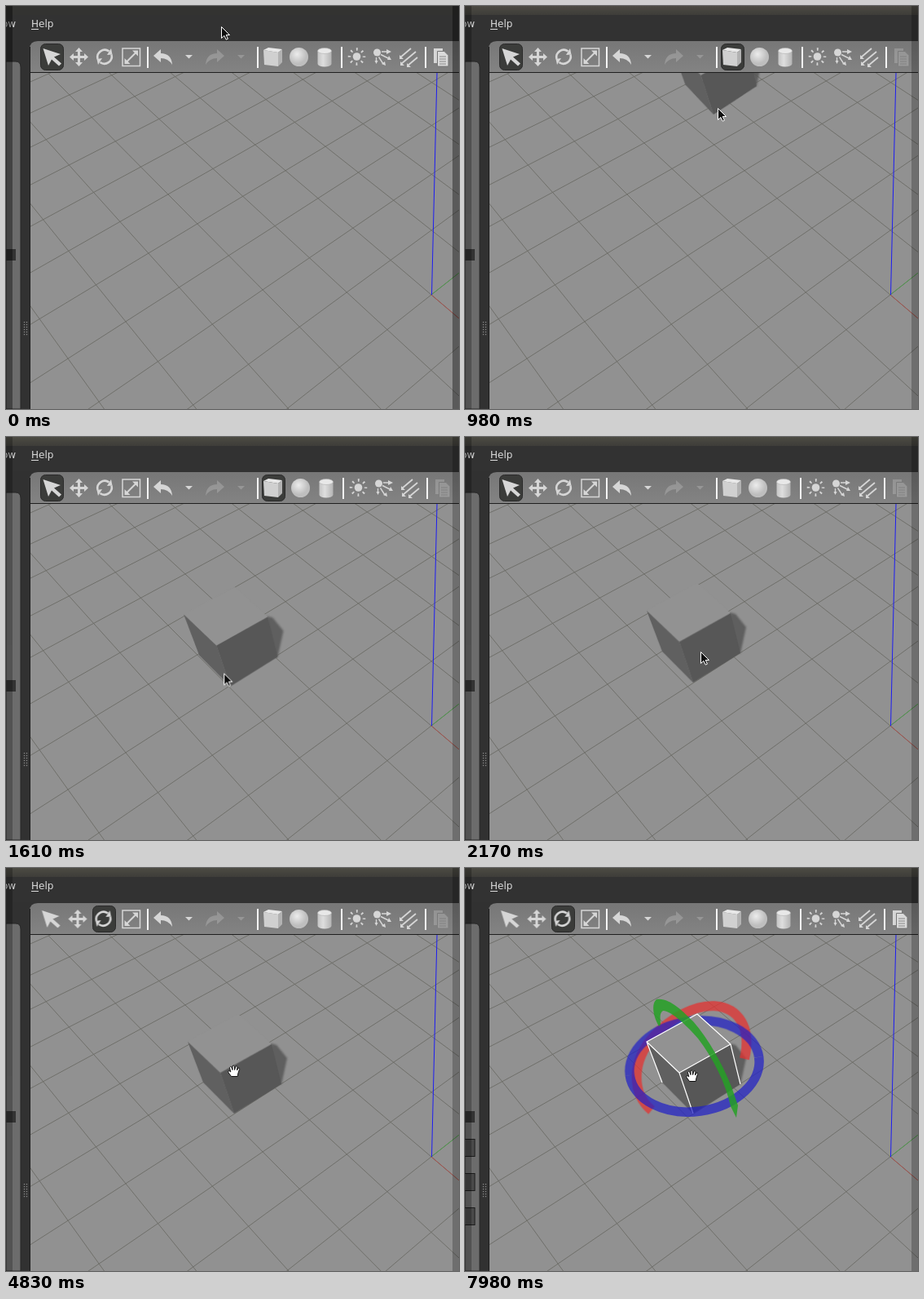
An HTML page that plays this animation: 556x494 px, repeating every 8 s.

```html
<!DOCTYPE html>
<html lang="en">
<head>
<meta charset="utf-8">
<title>Rotate tool</title>
<style>
html, body { margin: 0; width: 100%; height: 100%; overflow: hidden; background: #323232; }
svg { display: block; width: 100%; height: 100%; }
text { font: 12px "DejaVu Sans", sans-serif; fill: #dcdcdc; }
.anim, .anim * { animation-duration: 8s; animation-iteration-count: infinite; animation-timing-function: step-end; }

#arrow { animation-name: arrow; }
@keyframes arrow {
  0% { transform: translate(264px, 25px); }
  .875% { transform: translate(264px, 25px); animation-timing-function: steps(6, start); }
  6.125% { transform: translate(332px, 72px); }
  7.875% { transform: translate(332px, 72px); animation-timing-function: steps(6, start); }
  13.125% { transform: translate(310px, 125px); animation-timing-function: steps(4, start); }
  16.625% { transform: translate(282px, 268px); animation-timing-function: steps(2, start); }
  18.375% { transform: translate(253px, 303px); animation-timing-function: steps(4, start); }
  21.875% { transform: translate(272px, 285px); }
  25.375% { transform: translate(272px, 285px); animation-timing-function: steps(3, start); }
  28% { transform: translate(289px, 263px); animation-timing-function: steps(9, start); }
  35.875% { transform: translate(283px, 252px); animation-timing-function: steps(1, start); }
  37.625% { transform: translate(278px, 252px); animation-timing-function: steps(1, start); }
  59.5%, 100% { transform: translate(284px, 251px); }
}
#hand { animation-name: hand; }
@keyframes hand {
  0% { transform: translate(276px, 247px); }
  60.375% { transform: translate(272px, 241px); }
  88.375% { transform: translate(272px, 243px); animation-timing-function: steps(3, start); }
  91% { transform: translate(270px, 255px); }
  92.75% { transform: translate(270px, 255px); animation-timing-function: steps(2, start); }
  94.5% { transform: translate(268px, 254px); }
  99.75%, 100% { transform: translate(271px, 247px); }
}
#cube { transform-origin: 280px 301px; animation-name: cube; }
@keyframes cube {
  0% { transform: translate(53px, -221px) scale(.86); }
  7.875% { transform: translate(53px, -221px) scale(.86); animation-timing-function: steps(6, start); }
  13.125% { transform: translate(25px, -168px) scale(.91, .96); animation-timing-function: steps(4, start); }
  16.625% { transform: translate(12px, -21px) scale(.985); animation-timing-function: steps(2, start); }
  18.375% { transform: translate(-19px, 19px) scale(1.01); animation-timing-function: steps(4, start); }
  21.875%, 100% { transform: none; }
}

/* on / off states */
.arrowOn { animation-name: arrowOn; }
@keyframes arrowOn { 0% { opacity: 1; } 59.5%, 100% { opacity: 0; } }
.handOn { animation-name: handOn; }
@keyframes handOn { 0% { opacity: 0; } 59.5%, 100% { opacity: 1; } }
.grab { animation-name: grab; }
@keyframes grab { 0% { opacity: 0; } 82.25% { opacity: 1; } 88.375%, 100% { opacity: 0; } }
.open { animation-name: open; }
@keyframes open { 0% { opacity: 1; } 82.25% { opacity: 0; } 88.375%, 100% { opacity: 1; } }
.picked { animation-name: picked; }
@keyframes picked { 0% { opacity: 0; } 82.25%, 100% { opacity: 1; } }
.copy { animation-name: copy; }
@keyframes copy { 0% { opacity: 1; } 7.875% { opacity: .28; } 82.25%, 100% { opacity: 1; } }
.insert { animation-name: insert; }
@keyframes insert { 0% { opacity: 0; } 7.875% { opacity: 1; } 25.375%, 100% { opacity: 0; } }
.pushed { animation-name: pushed; }
@keyframes pushed { 0% { transform: none; } 7.875% { transform: translate(2px, 0); } 25.375%, 100% { transform: none; } }
.selOn { animation-name: selOn; }
@keyframes selOn { 0% { opacity: 1; } 46.375%, 100% { opacity: 0; } }
.rotOn { animation-name: rotOn; }
@keyframes rotOn { 0% { opacity: 0; } 46.375%, 100% { opacity: 1; } }
.nudge { animation-name: nudge; }
@keyframes nudge { 0% { transform: none; } 46.375%, 100% { transform: translate(-1.5px, 0); } }
.focus { animation-name: focus; }
@keyframes focus { 0% { opacity: 0; } 7.875%, 100% { opacity: 1; } }
.dim { animation-name: dim; }
@keyframes dim { 0% { opacity: .38; } 7.875%, 100% { opacity: .24; } }
.rows { animation-name: rows; }
@keyframes rows { 0% { opacity: 0; } 92.75%, 100% { opacity: 1; } }

.press { fill: #3b3c3a; stroke: #2a2a2a; }
.ico { fill: #d6d6d6; }
.ln { fill: none; stroke: #d6d6d6; stroke-width: 2.5; }
.sep { fill: #f4f4f4; }
.ring { fill: none; stroke: #1e1ec8; stroke-width: 11.5; opacity: .7; }
</style>
</head>
<body>
<svg viewBox="0 0 556 494" preserveAspectRatio="none">
  <defs>
    <linearGradient id="bar" x2="0" y2="1"><stop stop-color="#777"/><stop offset="1" stop-color="#838383"/></linearGradient>
    <linearGradient id="title" x2="0" y2="1"><stop stop-color="#4c4b43"/><stop offset="1" stop-color="#3e3d39"/></linearGradient>
    <linearGradient id="tube"><stop stop-color="#c4c4c4"/><stop offset=".4" stop-color="#dedede"/><stop offset="1" stop-color="#b4b4b4"/></linearGradient>
    <radialGradient id="ball" cx=".4" cy=".35"><stop stop-color="#ececec"/><stop offset="1" stop-color="#bebebe"/></radialGradient>
    <filter id="soft"><feGaussianBlur stdDeviation="1"/></filter>
  </defs>

  <!-- scene -->
  <rect x="29" y="81" width="527" height="413" fill="#919191"/>
  <path id="grid" fill="none" stroke="#6b6b66" stroke-width=".9"/>
  <path id="red" stroke="#a4524c"/>
  <path id="green" stroke="#4f9a4c"/>
  <path d="M529 82 522.5 354" stroke="#1c1cf2"/>

  <g class="anim">
    <g id="cube">
      <path d="M325 215 332 217 345 233 338 265 330 262Z" fill="#565656" opacity=".85" filter="url(#soft)"/>
      <g class="picked">
        <path d="M229 297C205 277 203 238 232 206C253 183 282 168 306 169C336 171 352 196 343 234" fill="none" stroke="#e8302e" stroke-width="12" opacity=".72"/>
        <path class="ring" d="M201.5 243A80 55.5 0 0 1 361.5 243" transform="rotate(-8 281.5 243)"/>
      </g>
      <path d="M223 213 285 179 326 216 263 251Z" fill="#929292"/>
      <path d="M223 213 263 251 280 301 242 263Z" fill="#606060"/>
      <path d="M263 251 326 216 338 265 280 301Z" fill="#575757"/>
    </g>
    <g class="picked">
      <path d="M242 263 223 213 285 179 326 216 338 265M223 213 263 251 326 216M263 251 280 301" fill="none" stroke="#fff" stroke-width="1.2"/>
      <path class="ring" d="M201.5 243A80 55.5 0 0 0 361.5 243" transform="rotate(-8 281.5 243)"/>
      <path d="M238 194C230 180 229 166 235 161C250 158 268 176 280 188C299 210 316 240 327 268L335 291 333 306 326 292C320 264 305 234 286 209C268 188 250 174 243 175C238 178 240 186 240 192Z" fill="#25a025" opacity=".85"/>
    </g>
  </g>

  <!-- window chrome -->
  <rect width="556" height="42" fill="#323232"/>
  <path d="M0 42H556V82H30V494H0Z" fill="#313131"/>
  <path d="M29 81V53Q29 43 39 43H556V81Z" fill="url(#bar)"/>
  <path d="M29 81.5H556M29.5 50V494" stroke="#1f1f1f" fill="none"/>
  <path d="M0 68H12Q18 68 18 75V494H0Z" fill="#6c6c6c" stroke="#262626"/>
  <rect y="298" width="12" height="14" fill="#333"/>
  <g class="anim"><g class="rows" fill="#4a4a4a" stroke="#1c1c1c">
    <rect x="-1" y="332.5" width="13" height="21"/>
    <rect x="-1" y="374.5" width="13" height="21"/>
    <rect x="-1" y="416.5" width="13" height="21"/>
  </g></g>
  <path d="M22.5 387V405M25.5 387V405" stroke="#8a8a8a" stroke-width="1.3" stroke-dasharray="1.3 1.7"/>
  <text x="-5" y="26">ow</text>
  <text x="31" y="26">Help</text>
  <path d="M31 28.5H40" stroke="#dcdcdc"/>

  <!-- toolbar -->
  <g class="anim">
    <rect class="press selOn" x="42.5" y="46.5" width="28" height="32" rx="6"/>
    <rect class="press rotOn" x="106.5" y="46.5" width="28" height="32" rx="6"/>
    <g class="nudge">
      <path class="ico" d="M45.5 52 67 59 59 62.5 68 70.5 65 73.5 56 65.5 52 73Z"/>
      <path class="ico" d="M89.5 51 94 56H91V61H96V58L101 62.5 96 67V64H91V69H94L89.5 74 85 69H88V64H83V67L78 62.5 83 58V61H88V56H85Z"/>
      <path class="ln" d="M112.5 65A9 9 0 0 1 126.5 55.5M129.5 59.5A9 9 0 0 1 115.5 69"/>
      <path class="ico" d="M124 60 130.5 59.5 129 52ZM118 64 111.5 65 113 72Z"/>
    </g>
    <path d="M143 52H164.5V73.5H143Z" fill="none" stroke="#d6d6d6" stroke-width="1.5"/>
    <path class="ln" d="M147 69.5 160.5 56" style="stroke-width:2"/>
    <path class="ico" d="M155 54.5H162V61.5ZM145.5 64V71H152.5Z"/>
    <rect class="sep" x="173" y="50" width="2" height="26"/>
    <path id="undo" class="ico" d="M181 61 190 53V58Q203 58 204 72Q199 64 190 64V69Z"/>
    <path class="ico" d="M220 60H229L224.5 64.5Z"/>
    <g opacity=".28">
      <use href="#undo" transform="matrix(-1 0 0 1 449 0)"/>
      <path class="ico" d="M284 60H293L288.5 64.5Z"/>
    </g>
    <rect class="sep" x="308" y="50" width="2" height="26"/>
    <rect class="press insert" x="314.5" y="46.5" width="28" height="32" rx="6"/>
    <path d="M316 54 322 51 339 53 334 57Z" fill="#e8e8e8"/>
    <path d="M316 54 334 57V74L317 72Z" fill="#d0d0d0"/>
    <path d="M334 57 339 53V69L334 74Z" fill="#b2b2b2"/>
    <g class="pushed">
      <circle cx="359.5" cy="62.5" r="11.5" fill="url(#ball)"/>
      <path d="M382.5 55V71A8.5 3.5 0 0 0 399.5 71V55Z" fill="url(#tube)"/>
      <ellipse cx="391" cy="55" rx="8.5" ry="3.5" fill="#e8e8e8" stroke="#b0b0b0" stroke-width=".6"/>
      <rect class="sep" x="411" y="50" width="2" height="26"/>
      <circle class="ico" cx="430.5" cy="62" r="4.8"/>
      <circle class="ln" cx="430.5" cy="62" r="9" style="stroke-width:3.5" stroke-dasharray="1.8 5.268" stroke-dashoffset=".9"/>
      <circle class="ico" cx="455.5" cy="57" r="4.5"/>
      <path class="ln" d="M461 56H468M460 59.5 469 64M457.5 62.5 463 71M454.5 63V69" style="stroke-width:1.4"/>
      <path class="ico" d="M467 53 473 56 467 59ZM468 66 470 61 473 66ZM461 71 465 68 466 73ZM452.5 67H456.5L454.5 71Z"/>
      <path class="ln" d="M484 63 497 52M485 71 503 56M493 73 505 63" style="stroke-width:1.8"/>
      <path class="ico" d="M483 60V65H488ZM484 68V73H489ZM492 70V75H497Z"/>
      <rect class="sep" x="514" y="50" width="2" height="26"/>
      <g class="copy">
        <path class="ico" d="M525 52H536V70H525Z"/>
        <path d="M529.5 55.5H538L543 60.5V74H529.5Z" fill="#dadada" stroke="#777"/>
        <path d="M532 62H540M532 65H540M532 68H540M532 71H540" stroke="#888"/>
      </g>
    </g>
  </g>

  <!-- title bar and dimmed margins -->
  <rect width="556" height="11" fill="#333331"/>
  <g class="anim">
    <rect class="focus" width="556" height="11" fill="url(#title)"/>
    <path class="dim" d="M0 0H8V494H0ZM548 0H556V494H548Z"/>
  </g>

  <!-- pointers -->
  <g class="anim">
    <g class="arrowOn"><g id="arrow">
      <path d="M.5 .5V14.500L3.900 11.400 6.200 16.200 8.400 15.200 6.200 10.500H10.500Z" fill="#0c0c0c" stroke="#fff"/>
    </g></g>
    <g class="handOn"><g id="hand" fill="#fff" stroke="#111">
      <path class="open" d="M4.500 14.500 1 9.800Q0 7.500 2 7.500L3.800 9 2.400 3.500Q3.500 1.500 4.800 3L6 6.500V1.800Q7.200 0 8.300 1.800L8.600 6.500 9.800 2.200Q11.200 1 12 2.600L11.500 7 13 4.200Q14.800 3.600 14.600 5.500L12.800 11 12.300 14.500Z"/>
      <path class="grab" d="M4 14.500 2.300 11V8Q2.300 6 4 6.500Q4 3.500 6.500 4.500Q8 3 9.500 4.500Q11 3.500 12 5.300Q14 5 14 7.500L13 11.500V14.500Z"/>
    </g></g>
  </g>
</svg>
<script>
// Ground plane in perspective: origin, two vanishing points, step per cell
const O = [522, 354], VX = [-770, -745], VY = [1915, -745], U = 0.0402, V = 0.0374;

function ground(x, y) {
  const a = U * x, b = V * y, w = 1 + a + b;
  return [0, 1].map(i => ((O[i] + a * VX[i] + b * VY[i]) / w).toFixed(2)).join(' ');
}
const line = (x1, y1, x2, y2) => `M${ground(x1, y1)}L${ground(x2, y2)}`;
const draw = (id, d) => document.getElementById(id).setAttribute('d', d);

let d = '';
for (let n = -10; n <= 10; n++) d += line(n, -10, n, 10) + line(-10, n, 10, n);
draw('grid', d);
draw('red', line(0, 0, -3, 0));
draw('green', line(0, 0, 0, 3));
</script>
</body>
</html>
```
